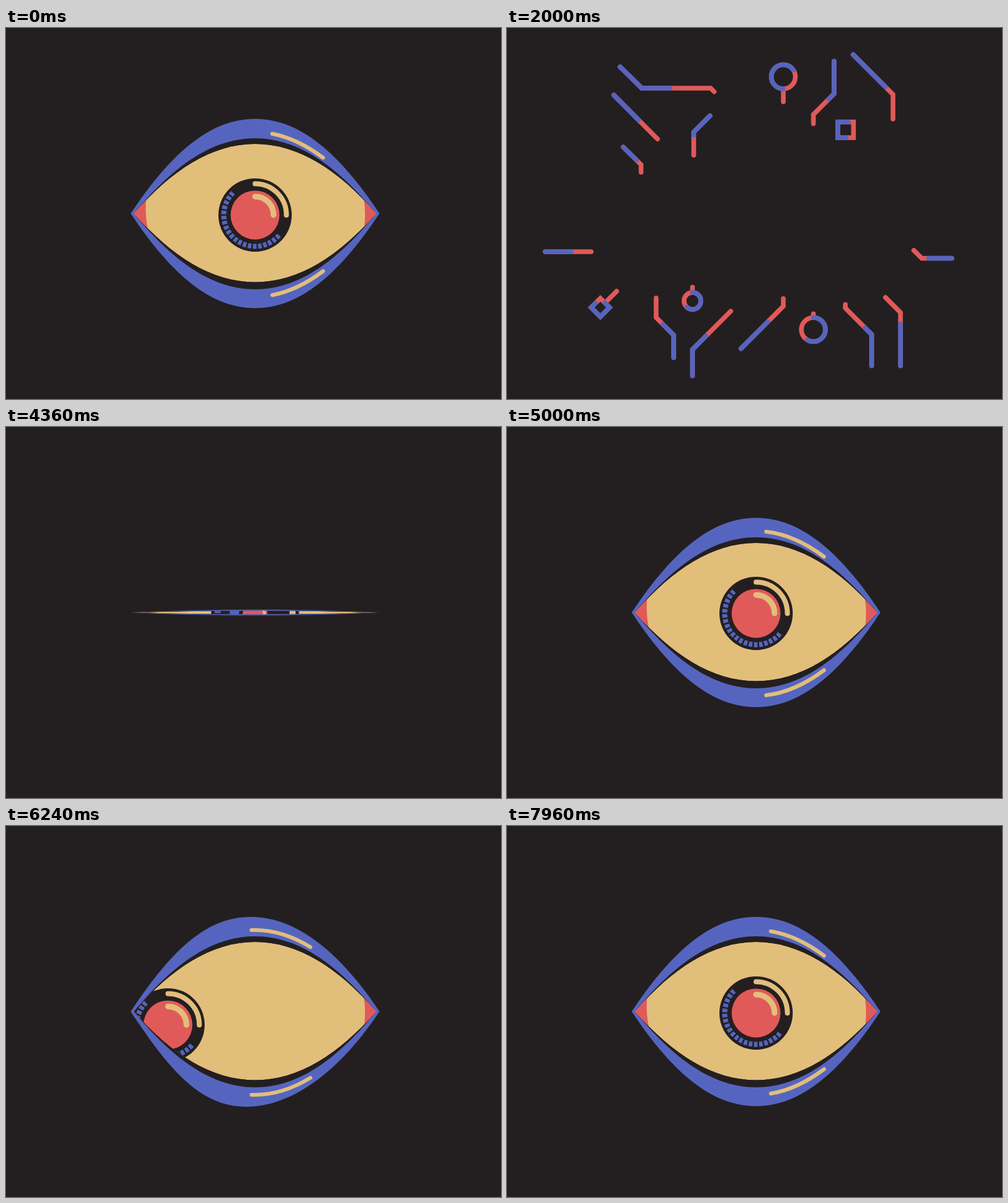
An HTML page with a canvas for the animation above (8 s loop, 790 by 592 pixels).

```html
<!DOCTYPE html>
<html lang="en">
<head>
<meta charset="utf-8">
<title>Circuit eye</title>
<style>
html, body { margin: 0; width: 100%; height: 100%; overflow: hidden; background: #231f20; }
canvas { display: block; }
</style>
</head>
<body>
<canvas id="stage" width="790" height="592"></canvas>
<script>
const ctx = document.getElementById('stage').getContext('2d');
const DARK = '#231f20', BLUE = '#5565bf', GOLD = '#e2be7b', RED = '#e05a59';
const LOOP = 8000, STEP = 40, CX = 397.5, CY = 296;

// Circuit traces, each running outward from the eye's axis
const traces = [
  'M214 296V218L185.5 190',
  'M255 296V192L170.5 107',
  'M369 296V140L325 96H215L180.5 62',
  'M298 296V166L324 140',
  'M441 296V97a19.2 19.2 0 0 0 0 -38.4a19.2 19.2 0 0 0 0 38.4',
  'M489 296V138L522 105V53',
  'M541 296V175H553V150H528V175H541',
  'M586 296V230L616 200V106L552.5 42.5',
  'M203 299L145 357H61',
  'M590 296L662 367.5H710',
  'M209 296V386L156.4 438.6L149 431.3L134.3 446L149 460.7L163.7 446L156.4 438.6',
  'M238 296V462L266 490V526',
  'M296 296V422a13.5 13.5 0 0 0 0 27a13.5 13.5 0 0 0 0 -27',
  'M372 296V437L296 513V555',
  'M441 296V444L373.5 511.5',
  'M489 296V462a19.2 19.2 0 0 0 0 38.4a19.2 19.2 0 0 0 0 -38.4',
  'M540 296V447L582 489V539',
  'M565 296V391L628 454V539'
].map(d => {
  const el = document.createElementNS('http://www.w3.org/2000/svg', 'path');
  el.setAttribute('d', d);
  return { path: new Path2D(d), length: el.getTotalLength() };
});

// Gaze keys: time, x offset, y offset
const gazeKeys = [
  [4900, 0, 0], [5000, 0, -1], [5300, 45, -28], [5650, 130, -5], [5950, 20, 38],
  [6240, -139, 19], [6560, -138, -12], [7000, -110, -22], [7400, -55, -14],
  [7680, -13, -2], [7840, 0, 0]
];

const progress = (t, from, to) => Math.min(1, Math.max(0, (t - from) / (to - from)));
const smooth = x => x * x * (3 - 2 * x);
const ease = (t, from, to) => smooth(progress(t, from, to));
const easeLate = (t, from, to) => smooth(1 - (1 - progress(t, from, to)) ** 1.3);

function slope(i, axis) {
  const before = gazeKeys[i - 1], after = gazeKeys[i + 1];
  return before && after ? (after[axis] - before[axis]) / (after[0] - before[0]) : 0;
}

function gaze(t) {
  const i = gazeKeys.findIndex((k, n) => n && t < k[0]) - 1;
  if (i < 0 || t < gazeKeys[0][0]) return [0, 0];
  const a = gazeKeys[i], b = gazeKeys[i + 1], span = b[0] - a[0], u = (t - a[0]) / span;
  return [1, 2].map(axis =>
    a[axis] + (b[axis] - a[axis]) * smooth(u) +
    span * (slope(i, axis) * u * (1 - u) ** 2 - slope(i + 1, axis) * u * u * (1 - u)));
}

function drawTraces(color, from, to) {
  if (to - from < 0.001) return;
  ctx.strokeStyle = color;
  ctx.lineWidth = 7.5;
  for (const { path, length } of traces) {
    ctx.setLineDash([length * (to - from), 1e4]);
    ctx.lineDashOffset = -from * length;
    ctx.stroke(path);
  }
  ctx.setLineDash([]);
  ctx.lineDashOffset = 0;
}

// Almond outline; near/far are the handles, measured from the tip and the peak
function almond(tip, up, down, near, far, steep, shiftUp = 0, shiftDown = 0) {
  const l = CX - tip, r = CX + tip, p = new Path2D();
  const mt = CX + shiftUp, mb = CX + shiftDown;
  p.moveTo(l, CY);
  p.bezierCurveTo(l + near, CY - up * steep, mt - far, CY - up, mt, CY - up);
  p.bezierCurveTo(mt + far, CY - up, r - near, CY - up * steep, r, CY);
  p.bezierCurveTo(r - near, CY + down * steep, mb + far, CY + down, mb, CY + down);
  p.bezierCurveTo(mb - far, CY + down, l + near, CY + down * steep, l, CY);
  return p;
}

function fill(path, color) {
  ctx.fillStyle = color;
  ctx.fill(path);
}

function disc(r, color) {
  const p = new Path2D();
  p.arc(0, 0, r, 0, 7);
  fill(p, color);
}

function arc(r, from, to, width, color) {
  ctx.beginPath();
  ctx.arc(0, 0, r, from * Math.PI, to * Math.PI);
  ctx.lineWidth = width;
  ctx.strokeStyle = color;
  ctx.stroke();
}

function drawIris(t, dx, dy) {
  const settle = t > 4000 ? ease(t, 4320, 4960) : 1;
  ctx.save();
  ctx.translate(CX + dx, 298.4 + dy);
  ctx.save();
  ctx.scale(1.2 - 0.2 * settle, 1.2 - 0.2 * settle);
  disc(58.5, DARK);
  ctx.lineCap = 'butt';
  ctx.setLineDash([5.6, 2.6]);
  arc(50, 0.224, 1.252, 8, BLUE);
  ctx.setLineDash([]);
  ctx.lineCap = 'round';
  arc(50, -0.5, 0, 8, GOLD);
  ctx.restore();
  if (settle < 1) {
    ctx.lineCap = 'butt';
    arc(33, 0.9, 1.1, 15 * (1 - settle), BLUE);
    ctx.lineCap = 'round';
  }
  const pupil = 0.5 + 0.5 * settle;
  ctx.scale(pupil, pupil);
  disc(39, RED);
  arc(29.5, -0.5, 0, 9, GOLD);
  ctx.restore();
}

// A piece of a parabola that follows the lid, mirrored on the lower lid
function drawShine(from, to, open) {
  if (to - from < 0.5) return;
  const k = 0.00345, mid = (from + to) / 2;
  const height = x => -131.5 + k * (x - 397) ** 2;
  const bend = height(from) + 2 * k * (from - 397) * (mid - from);
  ctx.strokeStyle = GOLD;
  ctx.lineWidth = 6;
  for (const side of [open, -open]) {
    ctx.beginPath();
    ctx.moveTo(from, 297.5 + side * height(from));
    ctx.quadraticCurveTo(mid, 297.5 + side * bend, to, 297.5 + side * height(to));
    ctx.stroke();
  }
}

function shineLoss(t) {
  if (t < 4000) return 2.25e-4 * (t < 280 ? 240 : t) ** 2;
  if (t < 7760) return 94 * (1 - ease(t, 4520, 5040));
  return 2.25e-4 * (t - 7760) ** 2;
}

const leftCorner = new Path2D('M195 250H228Q217 292 230 335H195Z');
const rightCorner = new Path2D('M600 250H566Q579 296 568 335H600Z');

// How far a lid edge is open; each edge starts closing at its own time
const openness = (t, closeAt, openAt) =>
  t > 4000 ? ease(t, openAt, 4740) : 1 - ease(t, closeAt, closeAt + 800);

function drawEye(t) {
  const upper = openness(t, 724, 4316);
  const lower = openness(t, 740, 4316);
  const gap = openness(t, 689, 4320);
  if (lower < 0.001) return;
  const [dx, dy] = gaze(t);

  fill(almond(198.5, 151 * upper, (151 + 0.05 * Math.max(0, dy)) * lower,
    62, 74, 0.615, dx * 0.05, dx * 0.1), BLUE);
  fill(almond(193.5, 120 * gap, 121 * gap, 60, 72, 0.6), DARK);

  const lens = almond(193.5, 111 * gap, 109.5 * gap, 60, 70, 0.62);
  ctx.save();
  ctx.clip(lens);
  fill(lens, GOLD);
  fill(leftCorner, RED);
  fill(rightCorner, RED);
  drawIris(t, dx, dy);
  ctx.restore();

  const shift = dx * 0.145;
  drawShine(412 + shift + shineLoss(t), 506 + shift, upper);
}

function draw(t) {
  ctx.fillStyle = DARK;
  ctx.fillRect(0, 0, 790, 592);
  ctx.lineCap = 'round';
  if (t < 3200) {
    const head = ease(t, 722, 1522);
    drawTraces(RED, easeLate(t, 1040, 3180), head);
    drawTraces(BLUE, easeLate(t, 1040, 2700), head);
  }
  drawEye(t);
}

const start = performance.now();
function tick() {
  const t = (performance.now() - start) % LOOP;
  draw(Math.floor(t / STEP) * STEP);
  requestAnimationFrame(tick);
}
tick();
</script>
</body>
</html>
```
